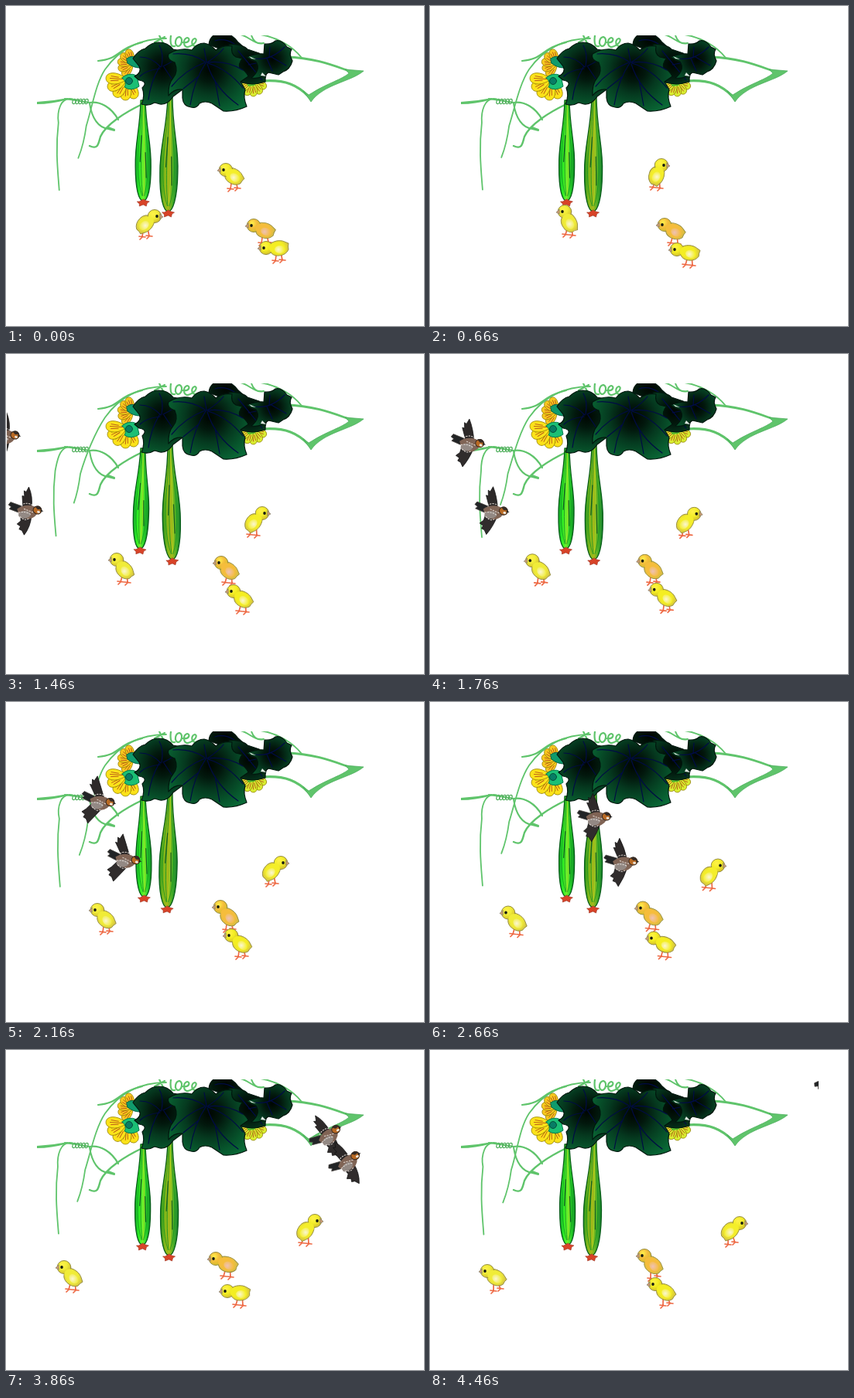
Write an HTML page with a canvas that moves like this. It is 540 px wide and 414 px high and loops after 4.56 s.

```html
<!DOCTYPE html>
<html lang="en">
<head>
<meta charset="utf-8">
<title>Garden</title>
<style>
html, body { margin: 0; width: 100%; height: 100%; overflow: hidden; background: #fff }
canvas { display: block }
</style>
</head>
<body>
<canvas width="540" height="414"></canvas>
<script>
const c = document.querySelector('canvas').getContext('2d');
const LOOP = 4560, TAU = Math.PI * 2;
const VINE = '#5fc46b';

// Poses are given at these steps; those between are interpolated.
const TICKS = [0, 7, 15, 22, 32, 39, 45];

// Each row: head x, head y, body x, body y
const CHICKS = [
  { color: '#f4ee2a', rows: [[284,212,294,220], [299,206,293,219], [331,206,320,218], [355,208,343,219], [389,215,378,230], [399,221,387,234], [400,224,388,234]] },
  { color: '#f0ec38', rows: [[192,272,180,282], [174,266,180,280], [143,266,153,279], [118,269,129,281], [84,276,95,288], [75,281,86,294], [74,286,85,294]] },
  { color: '#f5bd3c', rows: [[320,284,334,290], [303,283,316,291], [278,270,288,280], [277,265,288,278], [273,268,287,277], [271,270,286,277], [277,266,288,278]] },
  { color: '#f4ee22', rows: [[336,313,352,313], [319,315,335,319], [294,307,306,317], [291,302,304,313], [287,309,303,314], [286,312,302,314], [291,303,304,313]] }
];

// Each row: x, y, tilt in degrees, wing sweep
const BIRDS = [
  [[-270,97,12,0], [-150,102,12,0], [-3,106,12,0], [120,129,18,-9], [307,171,-2,0], [415,112,-24,0], [484,-2,-32,0]],
  [[-245,196,12,0], [-120,199,12,0], [26,203,12,0], [153,204,18,-9], [343,212,-2,0], [440,146,-24,0], [519,37,-32,0]]
];

function pose(rows, n) {
  let i = 0;
  while (i < TICKS.length - 2 && n >= TICKS[i + 1]) i++;
  const k = (n - TICKS[i]) / (TICKS[i + 1] - TICKS[i]);
  return rows[i].map((v, j) => v + (rows[i + 1][j] - v) * k);
}

function shape(d, fill, stroke, width = 1) {
  const p = new Path2D(d);
  if (fill) { c.fillStyle = fill; c.fill(p); }
  if (stroke) { c.strokeStyle = stroke; c.lineWidth = width; c.stroke(p); }
}

function oval(x, y, rx, ry, fill, stroke, turn = 0, width = 1) {
  c.beginPath();
  c.ellipse(x, y, rx, ry, turn, 0, TAU);
  if (fill) { c.fillStyle = fill; c.fill(); }
  if (stroke) { c.strokeStyle = stroke; c.lineWidth = width; c.stroke(); }
}

function placed(x, y, turn, draw) {
  c.save();
  c.translate(x, y);
  c.rotate(turn);
  draw();
  c.restore();
}

function glow(x, y, r, ...colors) {
  const g = c.createRadialGradient(x, y, 0, x, y, r);
  colors.forEach((color, i) => g.addColorStop(i / (colors.length - 1), color));
  return g;
}

function vines(swing) {
  const line = (d, w = 2) => shape(d, null, VINE, w);
  line('M76 120Q92 122 108 125C122 123 136 131 145 147', 2.2);
  shape('M40 124Q60 123 80 119L80 121Q58 127 40 127Z', VINE);
  for (let x = 88; x < 108; x += 4) oval(x, 123.5, 2, 3.2, null, '#4fae5b', .3, 1.2);
  line('M108 126C111 145 119 157 132 159L140 161M132 157L140 160');
  line('M176 127C155 137 129 153 122 169C119 179 119 186 108 181', 2.4);
  line('M119 71C147 69 143 55 176 47', 2.2);

  // the two hanging tendrils sway
  const a = 87 + 8 * swing, b = 64 + 6 * swing;
  line(`M207 42C170 42 145 58 128 82C116 100 ${a + 15 + 4 * swing} 130 ${a + 8 + 3 * swing} 155Q${a + 5 + 3 * swing} 178 ${a} ${192 + 6 * swing}`, 1.8);
  line(`M88 121C69 115 66 139 ${b - 1} 151C${b - 5} 185 ${b - 2} 212 ${b} ${235 + 4 * swing}`, 1.8);

  line('M192 47L205 40M198 38L203 48L210 52M213 38Q211 54 218 52', 2.2);
  oval(223, 46, 4, 6, null, VINE, .2, 2.2);
  line('M227 47C238 49 238 41 234 41C228 43 229 54 235 53C245 50 248 43 244 42C238 43 239 55 248 51', 2.2);
  line('M303 37C315 40 320 50 333 48C325 50 320 47 317 38M329 37C352 41 371 53 382 67');
  line('M332 97C362 95 377 103 391 117', 3.2);
  line('M362 66C399 67 423 77 443 84', 2.8);
  shape('M391 115L396 112C415 100 434 95 443 87L438 82L462 84C446 98 410 101 394 124L384 110Z', VINE, '#44a956', .7);
}

function flower(x, y, r, turn, color) {
  placed(x, y, turn, () => {
    for (let i = 0; i < 5; i++) placed(0, 0, (i - 2) * .52, () => {
      shape(`M0 0C${-r * .38} ${r * .4} ${-r * .33} ${r} 0 ${r}C${r * .33} ${r} ${r * .38} ${r * .4} 0 0Z`, color, '#8b7a00', .7);
      shape(`M0 ${r * .2}V${r * .8}M-2 ${r * .4}L-3 ${r * .75}M2 ${r * .4}L3 ${r * .75}`, null, '#b85518', .9);
    });
  });
}

function flowers() {
  flower(164, 75, 20, 1.75, '#f8c91e');
  flower(156, 95, 27, .6, '#fbe21a');
  shape('M156 68Q164 62 171 69L173 80Q164 80 157 74Z', '#109b6c', '#046143');
  shape('M150 93Q158 85 169 90L172 104Q162 111 153 105Q157 99 150 93Z', '#1bbf75', '#087b4c');
  oval(159, 97, 4.5, 4.5, '#087d65', '#045038');
  flower(318, 97, 20, -.1, '#d9ed31');
  shape('M308 96L326 96L321 103L313 104Z', '#55b92b');
}

function gourd(x, y, len, half, tip, colors) {
  placed(x, y, (x - tip) / len, () => {
    const edge = s => `C${s * 4} ${len * .3} ${s * half * 1.08} ${len * .43} ${s * half} ${len * .66}`;
    const g = c.createLinearGradient(-half, 0, half, 0);
    colors.forEach((color, i) => g.addColorStop(i / (colors.length - 1), color));
    shape(`M-3 0${edge(-1)}C${-half} ${len * .88} -6 ${len} 0 ${len}C6 ${len} ${half} ${len * .88} ${half} ${len * .66}C${half * 1.08} ${len * .43} 4 ${len * .3} 3 0Z`, g, '#075c18', 1.3);
    for (const s of [-.65, -.25, .2, .6]) {
      const w = s * half;
      shape(`M${s * 3} 4C${s * 4} ${len * .3} ${w * 1.1} ${len * .45} ${w} ${len * .68}Q${w * .9} ${len * .85} ${s * 2} ${len * .95}`, null, s === .2 ? '#b2df22' : '#169324', .8);
    }
    shape(`M-2 ${len * .35}L-4 ${len * .61}M3 ${len * .52}L4 ${len * .77}`, null, '#145c22', 1.2);
    shape(`M0 ${len - 2}L-5 ${len + 1}L-8 ${len + 1}L-5 ${len + 4}L-5 ${len + 7}L0 ${len + 5}L4 ${len + 7}L5 ${len + 3}L8 ${len + 1}L4 ${len}Z`, '#d84328', '#9b3220', .6);
  });
}

function leaf(outline, veins, x, y, r) {
  shape(outline, glow(x, y, r, '#000500', '#02180d', '#05391f', '#07532b', '#0a6a37'), '#00160d', 1.2);
  shape(veins, null, '#000b45', 1.2);
}

function leaves() {
  leaf('M262 50Q263 36 280 34Q292 36 300 47L310 56L300 66L283 58Z', 'M270 45Q282 41 295 49', 284, 44, 70);
  leaf('M288 50Q304 48 312 56L327 61Q336 70 341 82Q334 88 335 98Q320 103 304 99Q290 84 288 50Z', 'M300 58Q315 76 331 96M313 76L333 72', 314, 75, 62);
  leaf('M333 62L334 49Q343 50 348 45Q356 43 363 53L369 56Q365 62 370 71Q367 82 358 85L352 89L339 86Q329 95 317 93Q330 82 323 72Q316 70 311 66Q324 61 333 62Z', 'M322 68Q342 71 360 53M343 66L362 77M337 68L344 84M340 66L341 53', 344, 69, 44);
  shape('M314 65L323 69L317 68ZM331 86L336 91L329 90Z', '#dfe9e2');
  leaf('M197 47Q209 47 216 56L231 59L232 105L216 117Q209 128 199 127L192 125Q184 130 175 127Q180 116 176 106Q184 98 172 96L166 91Q176 86 172 78L164 68Q171 57 180 55Q188 47 197 47Z', 'M198 79Q187 98 184 121M199 81Q181 83 173 91M200 79Q188 66 173 66M201 78Q204 61 198 51M203 78Q220 70 225 62M204 79L220 103', 203, 80, 62);
  leaf('M256 48Q265 50 271 57Q281 50 292 52Q290 62 297 66L305 68Q300 75 302 80Q310 84 313 91L303 98L309 108Q306 118 311 130Q296 137 281 136L266 126Q257 122 250 126Q246 133 239 131Q229 130 228 119L228 108Q217 107 210 116Q209 101 216 93Q223 85 218 73Q207 69 210 62Q225 53 240 57Q247 48 256 48Z', 'M259 72Q243 96 238 128M260 75Q270 107 300 128M261 74Q287 82 306 106M261 73Q285 70 306 83M260 73Q275 63 281 55M259 72L256 55M257 72Q239 60 216 62M257 73Q231 83 214 104M249 91L229 107M270 96L276 129', 263, 82, 64);
}

function chick([hx, hy, bx, by], color, n) {
  const face = hx < bx ? -1 : 1, turn = Math.atan2(by - hy, bx - hx);
  const step = Math.sin(n * Math.PI / 2) * 2, rim = '#958d42';
  for (const [dx, dy] of [[-4, 17 + step / 2], [5, 16 - step / 2]]) {
    const x = bx + dx + step / 2, y = by + dy;
    shape(`M${bx + dx * .7} ${by + 8}L${x} ${y}M${x - 4} ${y - 1}L${x + 4} ${y}M${x} ${y}l-3 3`, null, '#ee6944', 1.7);
  }
  placed(bx, by, turn, () => {
    shape('M-12 -4C-8 -9 2 -11 8 -8L13 -6Q12 -2 13 2Q10 9 1 10C-8 11 -13 5 -12 -4Z', glow(0, 0, 14, color, color, '#cfbd45'), rim, .9);
  });
  oval(hx, hy, 8.8, 8.5, glow(hx - 2, hy - 3, 12, '#fff24a', color, '#d3bf2c'), rim);
  oval((hx + bx * 2) / 3, (hy + by * 2) / 3, 7, 6.5, color);
  const wing = color === '#f5bd3c' ? '#efc1b5' : '#fbf6d2';
  oval(bx + 2 * Math.cos(turn), by + 2, 7, 5, glow(bx, by + 2, 8, wing, color), null, turn);
  shape(`M${hx + face * 7} ${hy - 3}L${hx + face * 11} ${hy + 1}L${hx + face * 7} ${hy + 3}Z`, '#c99a70', '#858070', .7);
  oval(hx + face * 3, hy, 1.8, 2, '#141a10');
}

function bird([x, y, tilt, sweep]) {
  const up = sweep - 3, down = sweep + 4;
  placed(x, y, tilt * Math.PI / 180, () => {
    shape('M-7 -5L-22 -7L-24 -3L-20 -1L-22 2L-10 4Z', '#222426', '#4a4440', .7);
    shape(`M6 -5Q${up + 8} -20 ${up} -31L${up - 2} -24L${up - 5} -25L${up - 3} -18L${up - 6} -18L-5 -4Z`, '#2d2929', '#111', .7);
    shape(`M8 4Q${down + 6} 19 ${down} 31L${down - 4} 26L${down - 8} 25L${down - 7} 21L${down - 12} 19L${down - 8} 14L-7 3Z`, '#302c2c', '#111', .7);
    shape('M-12 0Q-4 -9 8 -8L16 -5Q15 6 5 10Q-7 11 -12 0Z', '#806455');
    oval(-1, 5, 8, 5, '#938984', null, -.3);
    oval(14, -4, 5.5, 5, '#b96a24', '#382a20');
    shape('M10 -8Q16 -12 19 -6L14 -5Z', '#352b25');
    shape('M18 -6L22 -4L18 -3Z', '#222');
    oval(16, -2, 2, 1.5, '#eee6da');
    c.setLineDash([1.5, 2]);
    shape('M-8 -6Q-2 -12 6 -9M-9 4Q0 0 8 4M-6 9Q2 14 6 8M-3 -2L9 0', null, '#e5ded8', 1);
    c.setLineDash([]);
  });
}

function draw(n) {
  const swing = .5 + .5 * Math.cos(TAU * (n - 3) / 20);
  c.fillStyle = '#fff';
  c.fillRect(0, 0, 540, 414);
  c.save();
  c.beginPath();
  c.rect(1, 38, 501, 376);
  c.clip();
  vines(swing);
  flowers();
  gourd(177, 122, 130, 10, 172.5 + 6 * swing, ['#14a52c', '#28ed22', '#6ff02b', '#24cf28', '#108626']);
  gourd(212, 118, 148, 11.5, 215.5 - 7.5 * swing, ['#219421', '#80b719', '#a5b91a', '#44ad27', '#148130']);
  leaves();
  for (const { rows, color } of CHICKS) chick(pose(rows, n), color, n);
  for (const rows of BIRDS) bird(pose(rows, n));
  c.restore();
}

const start = performance.now();
function tick() {
  const t = (performance.now() - start) % LOOP;
  draw(t < 60 ? 0 : 1 + Math.floor((t - 60) / 100));
  requestAnimationFrame(tick);
}
c.lineCap = c.lineJoin = 'round';
tick();
</script>
</body>
</html>
```
